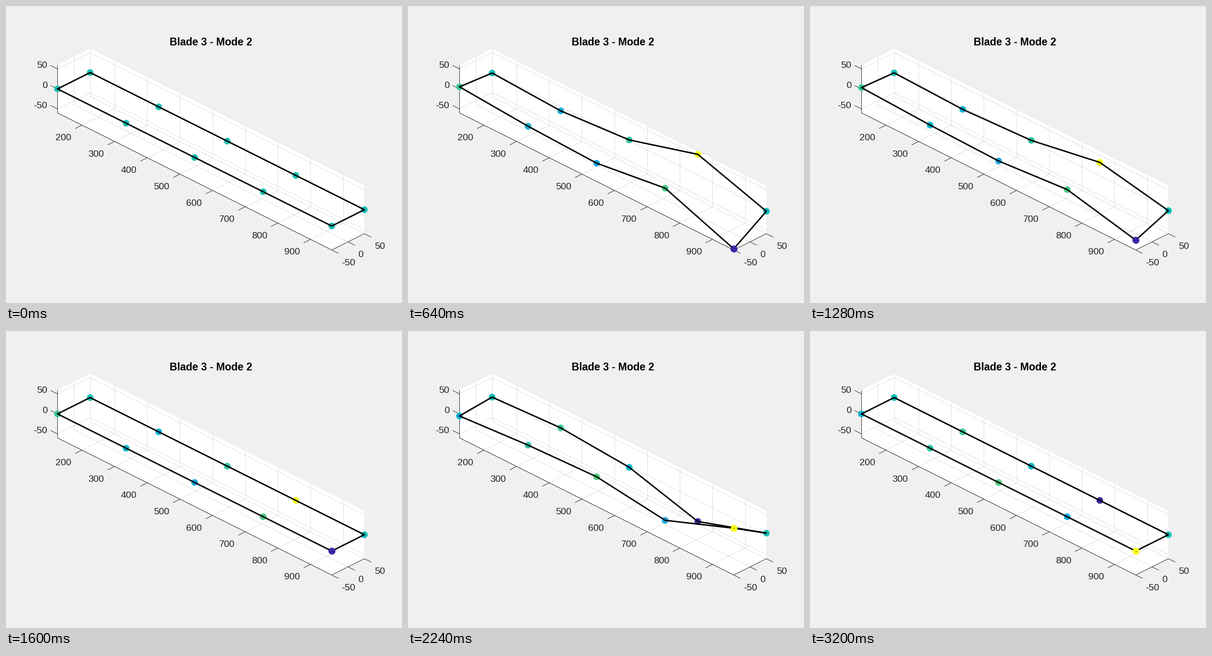
These frames come from a looping animation (864 by 648 pixels, 3.36 s). A matplotlib script:

```python
import numpy as np
import matplotlib.pyplot as plt
from matplotlib.animation import FuncAnimation
from matplotlib.colors import LinearSegmentedColormap

W, H, DPI = 864, 648, 144
PX = 72 / DPI                  # points per pixel
FRAMES, STEP_MS = 21, 160
INK = "#262626"
FONT = ["Liberation Sans", "DejaVu Sans"]

XLIM, YLIM, ZLIM = (125, 965), (-50, 50), (-60, 60)
X_TICKS, SIDE_TICKS = range(200, 901, 100), (-50, 0, 50)
SCALE = 669.6 / 940            # pixels per data unit along the screen x axis
Z_SCALE = SCALE * np.sqrt(1.5)


def project(x, y, z):
    """Orthographic view, azimuth 45 and elevation 30 degrees, to pixels."""
    px = 112.32 + SCALE * (x - XLIM[0] + y - YLIM[0])
    py = 312.66 + SCALE / 2 * (x - 545 - y) - Z_SCALE * z
    return px, py


fig = plt.figure(figsize=(W / DPI, H / DPI), dpi=DPI, facecolor="#f0f0f0")
ax = fig.add_axes([0, 0, 1, 1])
ax.set_xlim(0, W)
ax.set_ylim(H, 0)
ax.axis("off")


def segment(p, q, **style):
    (x0, y0), (x1, y1) = p, q
    ax.plot([x0, x1], [y0, y1], lw=1.04 * PX, solid_capstyle="butt", **style)


def grid(p, q):
    segment(project(*p), project(*q), color=INK, alpha=0.15, zorder=1)


def edge(p, q):
    segment(project(*p), project(*q), color=INK, zorder=2)


def tick(point, value, step, shift, align):
    """Draw a tick mark and its label beyond the outer end."""
    x, y = project(*point)
    end = x + step[0], y + step[1]
    segment((x, y), end, color=INK, zorder=2)
    ax.text(end[0] + shift[0], end[1] + shift[1] + 7.4, str(value),
            ha=align, va="baseline", color=INK, family=FONT,
            fontsize=20.8 * PX)


(x0, x1), (y0, y1), (z0, z1) = XLIM, YLIM, ZLIM

# White walls and floor, seen as one hexagon
outline = [(x0, y0, z1), (x0, y1, z1), (x1, y1, z1),
           (x1, y1, z0), (x1, y0, z0), (x0, y0, z0)]
ax.fill(*zip(*(project(*p) for p in outline)), color="white", lw=0, zorder=0)

for x in X_TICKS:
    grid((x, y0, z0), (x, y1, z0))
    grid((x, y1, z0), (x, y1, z1))
    tick((x, y0, z0), x, (-15, 7.5), (-8.2, 18.2), "right")
for y in SIDE_TICKS:
    grid((x0, y, z0), (x1, y, z0))
    grid((x0, y, z0), (x0, y, z1))
    tick((x1, y, z0), y, (15, 7.5), (6.8, 18.2), "left")
for z in SIDE_TICKS:
    grid((x0, y0, z), (x0, y1, z))
    grid((x0, y1, z), (x1, y1, z))
    tick((x0, y0, z), z, (-15, -7.5), (-7, -1.7), "right")

edge((x0, y0, z0), (x1, y0, z0))
edge((x1, y0, z0), (x1, y1, z0))
edge((x0, y0, z0), (x0, y0, z1))

ax.text(447.12, 86, "Blade 3 - Mode 2", ha="center", va="baseline",
        color="black", weight="bold", family=FONT, fontsize=22.9 * PX)

# Nodes run along the near side, then back along the far side
along = np.linspace(x0, x1, 5)
node_x = np.concatenate([along, along[::-1]])
node_y = np.repeat([y0, y1], 5)
shape = np.array([5.5, -8, -15, 9.4, -60, -4.1, 55.4, 3.15, -10.5, -1.2])
TIP = 4                        # node nearest the viewer

parula = LinearSegmentedColormap.from_list("parula", [
    (0, (0.242, 0.150, 0.660)),
    (8 / 63, (0.281, 0.301, 0.941)),
    (16 / 63, (0.196, 0.485, 0.989)),
    (24 / 63, (0.125, 0.646, 0.888)),
    (26 / 63, (0.095, 0.680, 0.860)),
    (28 / 63, (0.030, 0.708, 0.816)),
    (29 / 63, (0.004, 0.720, 0.792)),
    (30 / 63, (0.007, 0.731, 0.766)),
    (32 / 63, (0.096, 0.750, 0.712)),
    (34 / 63, (0.172, 0.767, 0.655)),
    (36 / 63, (0.216, 0.784, 0.592)),
    (38 / 63, (0.291, 0.797, 0.519)),
    (39 / 63, (0.341, 0.801, 0.479)),
    (1, (0.977, 0.984, 0.081)),
], N=256)

dot = dict(s=(14.6 * PX) ** 2, linewidths=0)
nodes = ax.scatter(node_x, node_y, zorder=3, **dot)
blade, = ax.plot([], [], color="black", lw=3.1 * PX, zorder=4,
                 solid_joinstyle="round", solid_capstyle="round")
tip = ax.scatter([0], [0], zorder=5, **dot)
speck = ax.scatter([0], [0], s=(1.6 * PX) ** 2, color="black",
                   linewidths=0, zorder=6)


def node_colors(k):
    """Colours span the displacement range, so only its sign matters."""
    if k == 0:
        return parula(np.full(len(shape), 32.5 / 64))
    level = shape if k <= 10 else -shape
    return parula((level - level.min()) / np.ptp(level))


def update(k):
    px, py = project(node_x, node_y, shape * np.sin(2 * np.pi * k / 20))
    points = np.column_stack([px, py])
    colors = node_colors(k)
    nodes.set_offsets(points)
    nodes.set_facecolors(colors)
    blade.set_data(np.append(px, px[0]), np.append(py, py[0]))
    tip.set_facecolors(colors[TIP:TIP + 1])
    for mark in (tip, speck):
        mark.set_offsets(points[TIP:TIP + 1])
        mark.set_visible(k > 0)
    return nodes, blade, tip, speck


anim = FuncAnimation(fig, update, frames=FRAMES, interval=STEP_MS,
                     init_func=lambda: update(0), repeat=True,
                     repeat_delay=0, blit=False)
plt.show()
```
